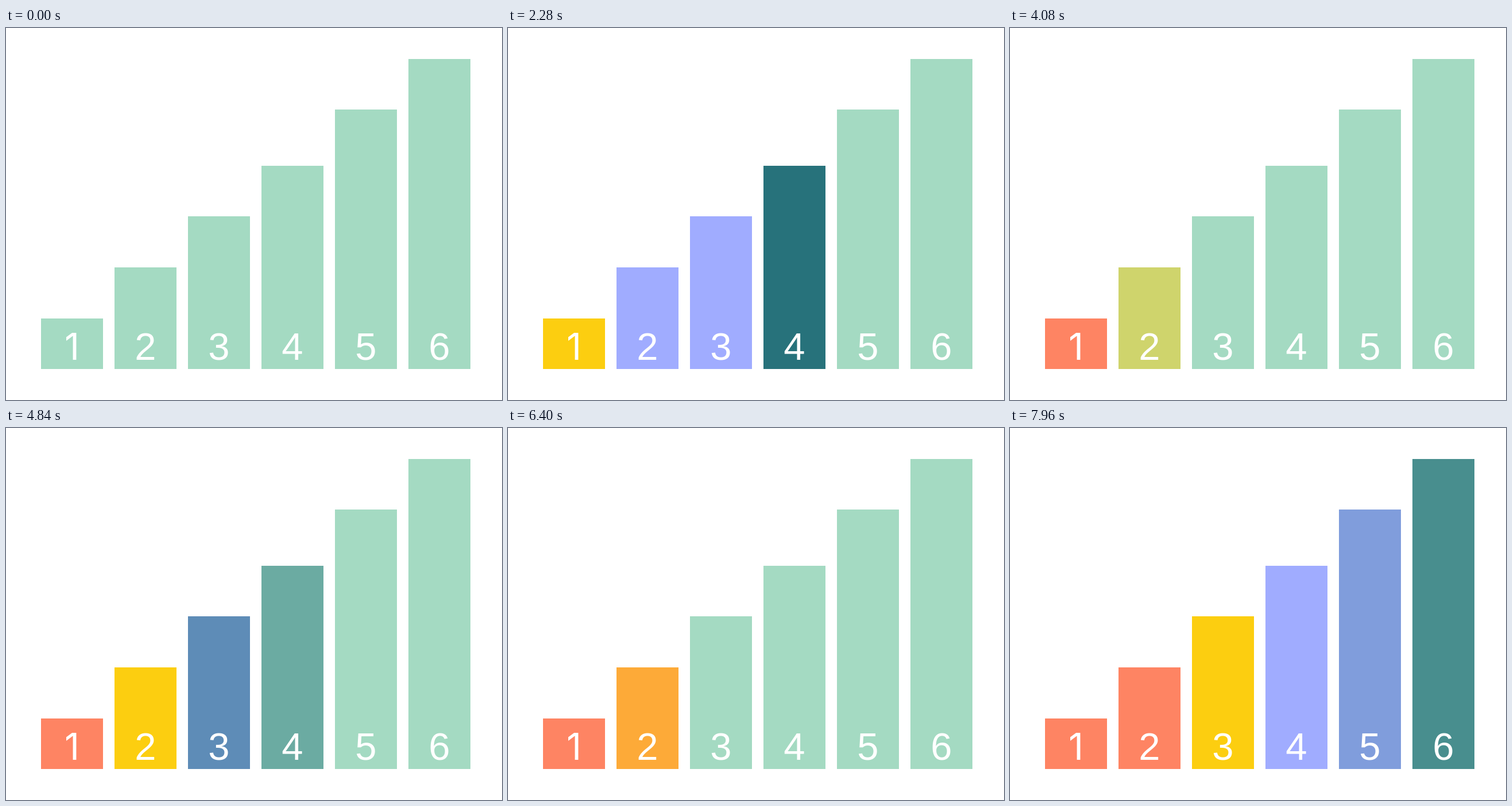
Write an HTML page that moves like this. It is 864 by 648 pixels and loops after 8000 ms.

```html
<!DOCTYPE html>
<html lang="en">
<head>
<meta charset="utf-8">
<title>Selection sort</title>
<style>
  html, body { margin: 0; width: 100%; height: 100%; overflow: hidden; background: #fff; }
  svg { display: block; width: 864px; height: 648px; }
  text { fill: #fff; font: 67px "Liberation Sans", Arial, sans-serif; text-anchor: middle; }
  /* a figure one without a foot */
  .one { font: 64px Inter, sans-serif; }
</style>
</head>
<body>
<svg id="stage" viewBox="0 0 864 648"></svg>
<script>
const LOOP = 8000, FADE = 240, BASE = 594;
const TOPS = [506, 417, 328, 240, 142, 54];
const IDLE = [164, 218, 194], SCAN = [39, 114, 123], SEEN = [160, 172, 255],
      LEAST = [252, 206, 16], SORTED = [254, 132, 99];

// One pass per sorted position: pick it, scan the rest, clear them, settle it.
const PASSES = [
  { pick: 925, scans: [1300, 1670, 2040, 2405, 2825], end: 3206, clear: 3400, settle: 3565 },
  { pick: 3965, scans: [4365, 4732, 5110, 5478], end: 5885, clear: 6120, settle: 6285 },
  { pick: 6685, scans: [7048, 7408, 7785] }
];

const stage = document.getElementById('stage');

function add(name, attributes) {
  const node = document.createElementNS('http://www.w3.org/2000/svg', name);
  for (const key in attributes) node.setAttribute(key, attributes[key]);
  return stage.appendChild(node);
}

const bars = TOPS.map((top, i) => {
  const x = 61 + 128 * i;
  const rect = add('rect', { x, y: top, width: 108, height: BASE - top });
  const label = add('text', { x: x + 54, y: 578 });
  label.textContent = i + 1;
  if (i === 0) label.setAttribute('class', 'one');
  return { rect, changes: [] };
});

function change(bar, time, color, fade = FADE) {
  bars[bar].changes.push({ time, color, fade });
}

PASSES.forEach(({ pick, scans, end, clear, settle }, first) => {
  change(first, pick, LEAST);
  scans.forEach((time, k) => {
    const bar = first + 1 + k, next = scans[k + 1] ?? end;
    change(bar, time, SCAN);
    if (next) change(bar, next, SEEN);
    if (clear) change(bar, clear, IDLE, 0);
  });
  if (settle) change(first, settle, SORTED);
});

function colorAt(changes, t) {
  let color = IDLE;
  for (const { time, color: goal, fade } of changes) {
    if (t < time) break;
    const p = fade ? Math.min(1, (t - time) / fade) : 1;
    color = color.map((c, i) => c + (goal[i] - c) * p);
  }
  return `rgb(${color.map(Math.round)})`;
}

const start = performance.now();

function draw() {
  const t = (performance.now() - start) % LOOP;
  for (const { rect, changes } of bars) rect.setAttribute('fill', colorAt(changes, t));
  requestAnimationFrame(draw);
}
draw();
</script>
</body>
</html>
```
